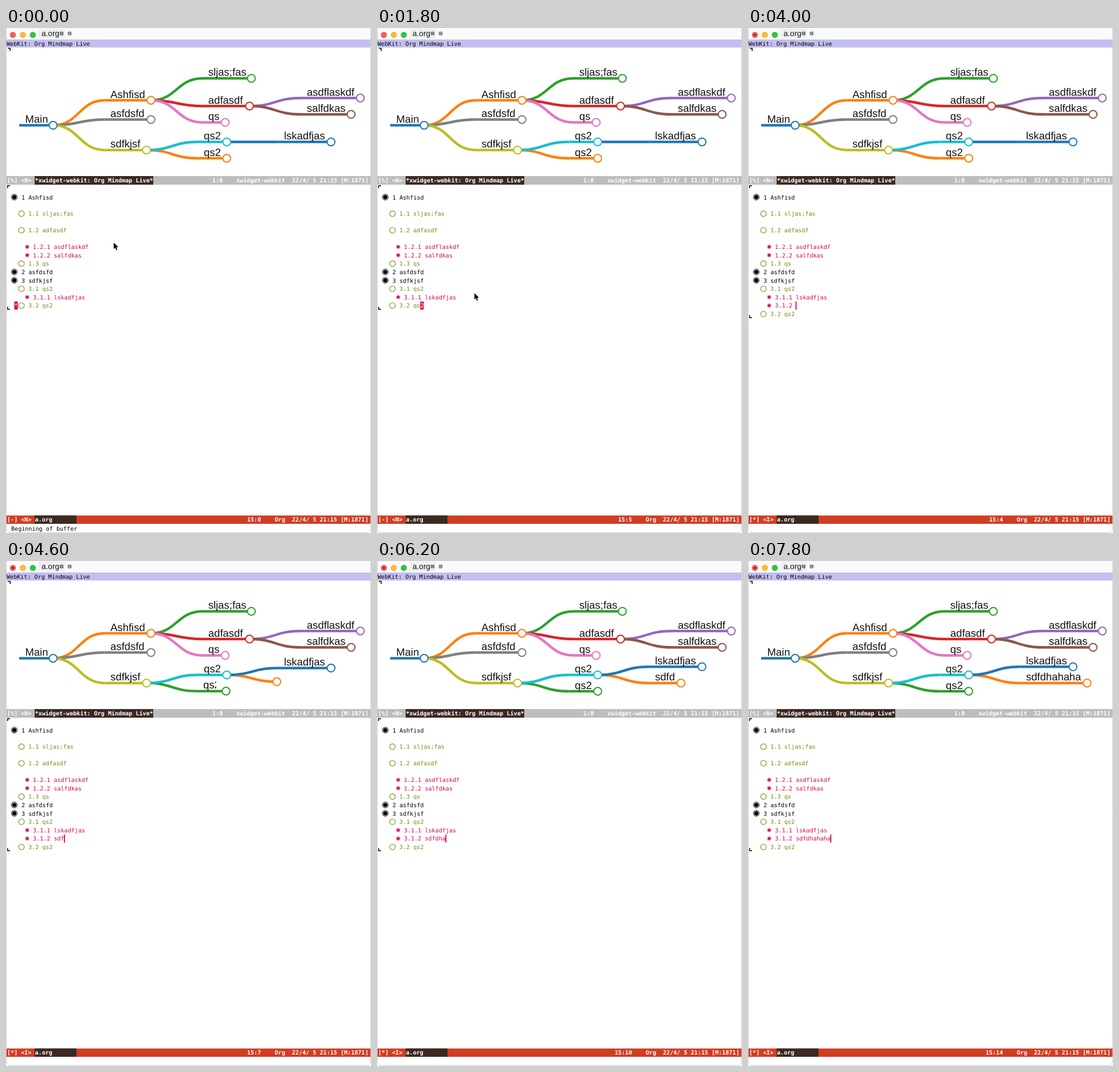
Recreate the animation shown at these times as an HTML page with a canvas. Size 637x880 px, loop 8 s.

```html
<!DOCTYPE html>
<html lang="en">
<head>
<meta charset="utf-8">
<title>Mind map beside an outline editor</title>
<style>
  html, body { margin: 0; width: 100%; height: 100%; overflow: hidden; background: #fff; }
  canvas { display: block; }
</style>
</head>
<body>
<canvas id="stage" width="637" height="880"></canvas>
<script>
const ctx = document.getElementById('stage').getContext('2d');
const LOOP = 8000, TICK = 200, MOVE = 500;
const MONO = '"DejaVu Sans Mono", monospace';
const SANS = '"Liberation Sans", Arial, sans-serif';
const CODE = '10.08px ' + MONO, BOLD = 'bold ' + CODE, LABEL = '18.4px ' + SANS;
const CELL = 6.07;
const C = {
  blue: '#1f77b4', orange: '#ff7f0e', green: '#2ca02c', red: '#d62728', purple: '#9467bd',
  brown: '#8c564b', pink: '#e377c2', gray: '#7f7f7f', olive: '#bcbd22', cyan: '#17becf',
  level: ['#000', '#758c12', '#d6084f'], cursor: '#e4004b', dark: '#3a2a22'
};
ctx.textRendering = 'geometricPrecision';

const lerp = (a, b, k) => a + (b - a) * k;
const ease = p => p < .5 ? 4 * p ** 3 : 1 - 4 * (1 - p) ** 3;
const progress = (t, start) => ease(Math.min(1, Math.max(0, (t - start) / MOVE)));
const latest = (list, t) => list.filter(item => item[0] <= t).pop();

function rect(x, y, w, h, color) {
  ctx.fillStyle = color;
  ctx.fillRect(x, y, w, h);
}
function text(str, x, y, color = '#000', font = CODE) {
  ctx.font = font;
  ctx.fillStyle = color;
  ctx.fillText(str, x, y);
}
function line(points, color, width) {
  ctx.beginPath();
  points.forEach(p => ctx.lineTo(...p));
  ctx.strokeStyle = color;
  ctx.lineWidth = width;
  ctx.stroke();
}
function circle(x, y, r, fill, stroke, width = 1) {
  ctx.beginPath();
  ctx.arc(x, y, Math.max(0, r), 0, 7);
  if (fill) { ctx.fillStyle = fill; ctx.fill(); }
  if (stroke) { ctx.strokeStyle = stroke; ctx.lineWidth = width; ctx.stroke(); }
}

// ---- Mind map ----
const ROOT = { label: 'Main', left: 23, textX: 33.5, cx: 82.3, y: 169.5, color: C.blue };

function node(label, parent, y, color, cx) {
  ctx.font = LABEL;
  const width = ctx.measureText(label).width;
  const textX = parent.cx + 100;
  return {
    label, parent, y, color, width, textX, left: parent.cx + 90,
    cx: cx ?? textX + width + (label ? 10.5 : -11)
  };
}
const ashfisd = node('Ashfisd', ROOT, 126, C.orange, 253);
const adfasdf = node('adfasdf', ashfisd, 136, C.red, 425);
const sdfkjsf = node('sdfkjsf', ROOT, 212.7, C.olive, 245.3);
const qs2 = node('qs2', sdfkjsf, 198.5, C.cyan, 385.2);
const leaf = node('lskadfjas', qs2, 198.5, C.blue, 567.2);
const oldSibling = node('qs2', sdfkjsf, 227, C.orange, 385.2);
const newSibling = node('qs2', sdfkjsf, 227, C.green, 385.2);
const fixedNodes = [
  ROOT, ashfisd, node('sljas;fas', ashfisd, 87.7, C.green, 428.2), adfasdf,
  node('asdflaskdf', adfasdf, 122, C.purple, 618.3), node('salfdkas', adfasdf, 150.5, C.brown, 602.3),
  node('qs', ashfisd, 164.5, C.pink, 382.5), node('asfdsfd', ROOT, 159.5, C.gray, 253), sdfkjsf, leaf, qs2
];
// Every refresh replaces the edited node: the old one returns to the root, a new one leaves it.
const refreshes = [[4150, ''], [4750, 'sdfd'], [5130, 'sdfd'], [6400, 'sdfdhah'], [6833, 'sdfdhaha'], [7300, 'sdfdhahaha']]
  .map(([start, label]) => {
    const spread = label ? 14.2 : 12;
    return { start, leafY: qs2.y - spread, added: node(label, qs2, qs2.y + spread, C.orange) };
  });

function link(x0, y0, x1, y1, color, width = 4.4) {
  const mid = (x0 + x1) / 2;
  ctx.beginPath();
  ctx.moveTo(x0, y0);
  ctx.bezierCurveTo(mid, y0, mid, y1, x1, y1);
  ctx.strokeStyle = color;
  ctx.lineWidth = width;
  ctx.stroke();
}
function drawLink(n) {
  if (n.parent) link(n.parent.cx, n.parent.y, n.left, n.y, n.color);
}
function drawNode(n) {
  rect(n.left, n.y - 2.2, n.cx - n.left, 4.4, n.color);
  circle(n.cx, n.y, 6.8, '#fff', n.color, 2);
  text(n.label, n.textX, n.y - 4.3, '#111', LABEL);
}
function drawMovingLink({ n, k, leaving }) {
  const fromRoot = (x, y) => [lerp(ROOT.cx, x, k), lerp(ROOT.y, y, k)];
  link(...fromRoot(n.parent.cx, n.parent.y), ...fromRoot(n.left, n.y), n.color, leaving ? 4.4 * k : 4.4);
}
function drawMovingNode({ n, k, leaving }) {
  const at = x => lerp(ROOT.cx, x, k), y = lerp(ROOT.y, n.y, k);
  const textX = lerp(ROOT.cx - (leaving ? n.width + 21 : 18), n.textX, k);
  rect(at(n.left), y - 2.2, at(n.cx) - at(n.left), 4.4, n.color);
  circle(at(n.cx), y, leaving ? 6.8 * k : 6.8, '#fff', n.color, leaving ? 2 * Math.min(1, k + .4) : 2);
  ctx.save();
  ctx.beginPath();
  ctx.rect(textX, y - 24, Math.max(0, leaving ? n.width - 7 : n.width * k - 7), 30);
  ctx.clip();
  ctx.globalAlpha = k;
  text(n.label, textX, y - 4.3, '#111', LABEL);
  ctx.restore();
}

function drawMap(t) {
  const index = refreshes.findLastIndex(r => r.start <= t);
  const settled = [], moving = [];
  leaf.y = qs2.y;
  if (index < 0) settled.push(oldSibling);
  else {
    const current = refreshes[index], previous = refreshes[index - 1];
    const k = progress(t, current.start);
    const swap = (before, after) => {
      if (k === 1) return settled.push(after);
      if (before) moving.push({ n: before, k: 1 - k, leaving: true });
      moving.push({ n: after, k });
    };
    leaf.y = lerp(previous?.leafY ?? qs2.y, current.leafY, k);
    swap(previous?.added, current.added);
    if (previous) settled.push(newSibling);
    else swap(oldSibling, newSibling);
  }
  const still = [...settled, ...fixedNodes];
  moving.forEach(drawMovingLink);
  still.forEach(drawLink);
  moving.forEach(drawMovingNode);
  still.forEach(drawNode);
}

// ---- Outline ----
const outline = [
  '1 Ashfisd', '', '1.1 sljas;fas', '', '1.2 adfasdf', '', '1.2.1 asdflaskdf', '1.2.2 salfdkas',
  '1.3 qs', '2 asfdsfd', '3 sdfkjsf', '3.1 qs2', '3.1.1 lskadfjas', '3.2 qs2'
];
const NEW_ROW = 13;
const TEXT_X = [27, 39, 47];
const rowY = r => 294.7 + 14.38 * r + .012 * r * r;
const levelOf = str => /^\d/.test(str) ? str.split(' ')[0].split('.').length : 0;

// time, editor state, line, column, text of the new row
const edits = [
  [0, 'N', 15, 0], [200, 'N', 10, 4], [600, 'V', 10, 5], [1000, 'N', 15, 5], [2800, 'N', 14, 5],
  [3000, 'I', 14, 13], [3200, 'I', 15, 0, ''], [3600, 'I', 15, 1, '*'], [3800, 'I', 15, 3, '***'],
  [4000, 'I', 15, 4, '3.1.2 ']
];
function type(start, before, added) {
  [...added].forEach((_, i) => {
    const title = before + added.slice(0, i + 1);
    edits.push([start + i * TICK, 'I', 15, 4 + title.length, '3.1.2 ' + title]);
  });
}
type(4200, '', 'sdf');
type(4800, 'sdf', 'd');
type(6000, 'sdfd', 'hahaha');

function drawBullet(level, y) {
  const color = C.level[level - 1];
  if (level === 1) {
    circle(14.5, y, 5.1, null, color, 1);
    circle(14.5, y, 3.7, color);
  } else if (level === 2) circle(27, y, 4.9, null, color, 1.1);
  else {
    for (let i = 0; i < 4; i++) {
      const dx = 3.8 * Math.cos(i * Math.PI / 4), dy = 3.8 * Math.sin(i * Math.PI / 4);
      line([[37 - dx, y - dy], [37 + dx, y + dy]], color, 1.1);
    }
    circle(37, y, 2.1, color);
  }
}

function drawOutline([, mode, lineNo, col, added]) {
  const rows = [...outline];
  if (added !== undefined) rows.splice(NEW_ROW, 0, added);
  const row = lineNo - 2, y = rowY(row), level = levelOf(rows[row]);
  if (mode === 'V') rect(82, y - 7.5, 552, 14.5, '#cde4ed');

  rows.forEach((str, r) => {
    const depth = levelOf(str);
    if (depth) drawBullet(depth, rowY(r));
    text(str, depth ? TEXT_X[depth - 1] : 9, rowY(r) + 3.8, C.level[Math.max(0, depth - 1)]);
  });

  const offset = level ? col + level - 1 : col;
  const x = level && !col ? 14.5 : (level ? TEXT_X[level - 1] : 9) + offset * CELL;
  if (mode === 'I') rect(x - .5, y - 7, 1.8, 14, C.cursor);
  else {
    rect(x, y - 7, 6.1, 14, C.cursor);
    text(level && !col ? '*' : rows[row][offset] || '', x, y + 3.8, '#fff');
  }
  const end = rowY(rows.length - 1);
  line([[2.8, end + 2], [2.8, end + 6.5], [7, end + 6.5]], '#000', 1.5);
}

// ---- Window ----
function modeLine(y, height, bg, flags, name, nameWidth, position, major, majorX) {
  const base = y + 10.5;
  rect(1, y, 635, height, bg);
  rect(50, y, nameWidth, height, C.dark);
  text(flags, 2, base, '#fff', BOLD);
  text(name, 50.5, base, '#fff', BOLD);
  text(position, 445 - position.length * CELL, base, '#fff', BOLD);
  text(major, majorX, base, '#fff', BOLD);
  text('22/4/ 5 21:15 [M:1871]', 499, base, '#fff', BOLD);
}

function drawWindow(t, [, mode, lineNo, col, added]) {
  const modified = added !== undefined;
  rect(0, 0, 637, 880, '#fff');
  rect(0, 0, 637, 20, '#fafafa');
  rect(57, 1, 46, 17, '#f0f0f0');
  ['#fc5b57', '#fdbc2e', '#29c840'].forEach((c, i) => circle(12 + 17.4 * i, 12, 5.2, c, '#0002', .6));
  if (modified) circle(12, 12, 1.8, '#6d0808');
  text('a.org', 62, 14, '#111', '13.6px ' + SANS);
  text('⊠', 93.7, 13, '#222', '11px ' + MONO);
  text('⊞', 107.7, 13, '#222', '11px ' + MONO);
  rect(0, 20, 636, 14, '#c2bff0');
  text('WebKit: Org Mindmap Live', 1, 30.5);
  line([[3, 35.5], [7.3, 35.5], [7.3, 40]], '#000', 1.5);
  line([[7, 274.8], [2.8, 274.8], [2.8, 279]], '#000', 1.5);

  modeLine(258, 15, '#bdbdbd', '[%] <N>', '*xwidget-webkit: Org Mindmap Live*', 207, '', 'xwidget-webkit', 402);
  text('1:0', 360, 268.5, '#fff', BOLD);
  modeLine(849.5, 14.5, '#d13d23', `[${modified ? '*' : '-'}] <${mode}>`, 'a.org', 73, `${lineNo}:${col}`, 'Org', 469);
  if (t < 200) text('Beginning of buffer', 9, 875.5);

  ctx.beginPath();
  ctx.roundRect(.5, -10, 636, 889.5, 9);
  ctx.strokeStyle = '#cfcfcf';
  ctx.lineWidth = 1;
  ctx.stroke();
}

// time, x, y, button pressed
const pointerPath = [
  [0, 188, 374], [200, 187, 395], [400, 187, 410, true], [600, 186, 450, true], [800, 186, 480, true],
  [1000, 185, 480], [1800, 170, 462], [2000, 146, 436], [2200, 125, 413], [2400, 113, 400]
];
function drawPointer(t) {
  if (t >= 2800) return;
  const [, x, y, pressed] = latest(pointerPath, t);
  if (pressed) circle(x - .5, y, 17.5, null, '#111', 2.5);
  ctx.beginPath();
  [[0, 0], [0, 11], [2.5, 8.8], [4.4, 13], [6.3, 12.2], [4.5, 8.2], [7.8, 7.8]]
    .forEach(([dx, dy]) => ctx.lineTo(x + dx, y + dy));
  ctx.closePath();
  ctx.strokeStyle = '#fff';
  ctx.lineWidth = 1.5;
  ctx.stroke();
  ctx.fillStyle = '#000';
  ctx.fill();
}

function frame() {
  const t = Math.floor(performance.now() % LOOP / TICK) * TICK;
  const edit = latest(edits, t);
  drawWindow(t, edit);
  drawMap(t);
  drawOutline(edit);
  drawPointer(t);
  requestAnimationFrame(frame);
}
frame();
</script>
</body>
</html>
```
